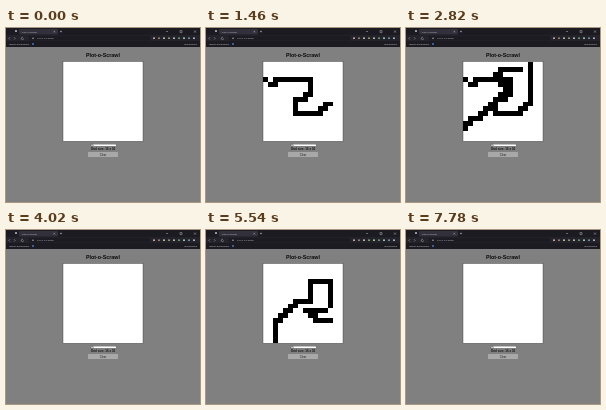
An HTML page that plays this animation: 194x174 px, repeating every 8 s.

```html
<!DOCTYPE html>
<html lang="en">
<head>
<meta charset="utf-8">
<title>Plot-o-Scrawl</title>
<style>
  html, body { margin: 0; width: 100%; height: 100%; overflow: hidden; background: #808080; }
  svg { display: block; width: 100vw; height: 100vh; }
  text { font-family: "Liberation Sans", Arial, sans-serif; }
  .mid { text-anchor: middle; }
  .ui { fill: #c4c4cc; font-size: 2.5px; }
</style>
</head>
<body>
<svg viewBox="0 0 194 174">
  <rect width="194" height="174" fill="#808080"/>

  <!-- browser bars -->
  <rect width="194" height="19" fill="#1c1b22"/>
  <rect y="7" width="194" height="6" fill="#24232c"/>
  <rect x="13" y="1" width="39" height="5.5" rx="1" fill="#32313b"/>
  <rect x="9" y="2" width="2" height="2" rx=".5" fill="#a0a0a8"/>
  <text class="ui" x="16" y="4.6">Plot-o-Scrawl</text>
  <g fill="none" stroke="#b5b5bc" stroke-width=".5">
    <path d="M47.5 2.8l1.6 1.6m0-1.6l-1.6 1.6M54 3.5h2m-1-1v2M160 3.5h2M174 2.6h2v2h-2zM188 2.6l2 2m0-2l-2 2"/>
    <path d="M4 9.2l-1.2 1.2 1.2 1.2M8 9.2l1.2 1.2-1.2 1.2M17 9.4a1.2 1.2 0 1 0 .6 1"/>
  </g>
  <rect x="23" y="7.8" width="121" height="4.6" rx="1" fill="#1c1b22"/>
  <circle cx="27" cy="10.2" r=".7" fill="#c4c4cc"/>
  <text class="ui" x="31" y="11.1">127.0.0.1:5500</text>
  <g id="icons"></g>
  <text class="ui" x="3" y="16.8">Import bookmarks</text>
  <circle cx="27" cy="16" r=".9" fill="#4a80d8"/>
  <text class="ui" x="191" y="16.8" text-anchor="end">Bookmarks</text>

  <!-- page -->
  <text class="mid" x="97" y="28.8" font-size="5.3" font-weight="700" fill="#080808">Plot-o-Scrawl</text>
  <rect x="57" y="33.5" width="80" height="79.8" fill="#fff" stroke="#333" stroke-width=".4"/>
  <g id="board" shape-rendering="crispEdges"></g>
  <rect x="86" y="116.6" width="24" height="1.5" rx=".7" fill="#fff"/>
  <circle cx="86" cy="117.3" r="1.2" fill="#eee" stroke="#222" stroke-width=".5"/>
  <text class="mid" x="97" y="122.3" font-size="3" font-weight="700" fill="#111">Grid size: 16 x 16</text>
  <rect x="82" y="124" width="30" height="5" rx=".6" fill="#a8a8a8"/>
  <text class="mid" x="97" y="127.5" font-size="2.8" fill="#222">Clear</text>
</svg>
<script>
const LOOP = 8000, STEP = 80;
const CLEAR = [4020, 7780];
const LEFT = 57, TOP = 34, CELL_W = 5, CELL_H = 4.94;

// pen strokes: start, duration in steps, turning points in grid cells
const strokes = [
  [500, 11, '0,3 1,4 2,4 2,3 9,3 9,6 6,8 6,10 11,10'],
  [1380, 7, '11,9 13,7 13,0'],
  [2100, 10, '11,1 8,1 6,2 6,3 8,5 8,6 5,9 0,13'],
  [4580, 4, '2,15 2,11 6,7 8,7 9,5 9,3'],
  [4980, 8, '10,3 13,3 13,8 12,9 8,9 10,11 13,11'],
  [5620, 3, '9,7 6,9'],
  [5860, 2, '14,3 14,4 9,4 5,5'],
  [6100, 3, '5,6 3,6 2,7 2,8 5,8 5,9'],
  [6420, 6, '3,12 8,12 8,13 15,13']
];

const make = (parent, tag, attrs) => {
  const el = document.createElementNS('http://www.w3.org/2000/svg', tag);
  for (const key in attrs) el.setAttribute(key, attrs[key]);
  return parent.appendChild(el);
};

// cells under the pen; long slopes become connected stairs
function trace(corners) {
  const [first, ...rest] = corners.split(' ').map(p => p.split(',').map(Number));
  const path = [first];
  let [a, b] = first;
  for (const [x, y] of rest) {
    const n = Math.max(Math.abs(x - a), Math.abs(y - b));
    for (let k = 1; k <= n; k++) {
      const cx = Math.round(a + (x - a) * k / n);
      const cy = Math.round(b + (y - b) * k / n);
      const [px, py] = path[path.length - 1];
      if (n > 1 && cx !== px && cy !== py) path.push([cx, py]);
      path.push([cx, cy]);
    }
    [a, b] = [x, y];
  }
  return path;
}

const icons = document.getElementById('icons');
for (let i = 0; i < 9; i++) {
  make(icons, 'circle', {
    cx: 148 + i * 5, cy: 10.2, r: 0.9,
    fill: `hsl(${i * 26} 30% ${i % 2 ? 58 : 82}%)`
  });
}

const board = document.getElementById('board');
const cells = strokes.flatMap(([start, steps, corners]) =>
  trace(corners).map(([x, y], i, path) => ({
    from: start + Math.floor(i * steps / path.length) * STEP,
    to: CLEAR.find(t => t > start),
    el: make(board, 'rect', {
      x: LEFT + x * CELL_W, y: TOP + y * CELL_H, width: CELL_W, height: CELL_H
    })
  })));

function draw(now) {
  const t = now % LOOP;
  for (const { from, to, el } of cells)
    el.setAttribute('visibility', t >= from && t < to ? 'visible' : 'hidden');
  requestAnimationFrame(draw);
}
draw(performance.now());
</script>
</body>
</html>
```
